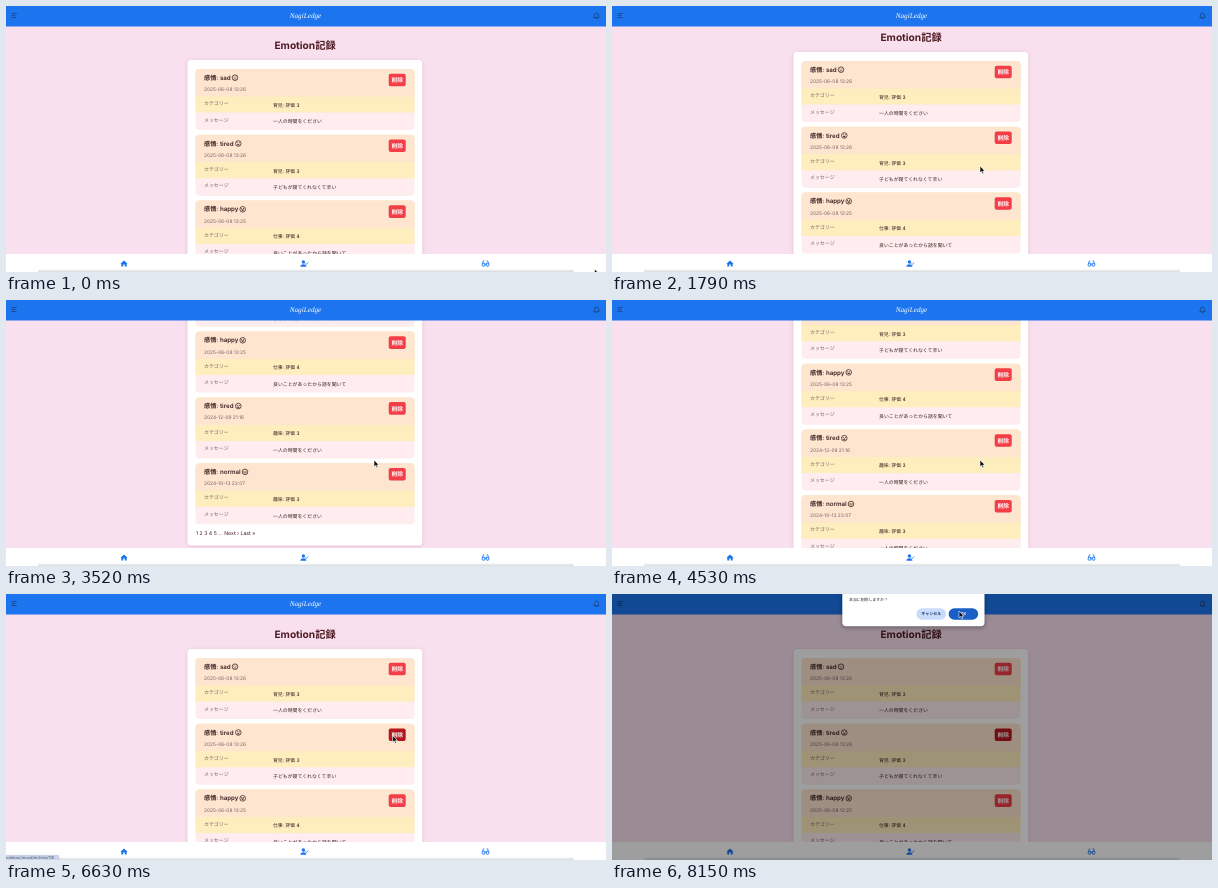
Animation, 600 px wide and 266 px high, one loop 8.2 s. Source, as an HTML page:

```html
<!DOCTYPE html>
<html lang="ja">
<head>
<meta charset="utf-8">
<title>Emotion記録</title>
<style>
html, body { margin: 0; width: 100%; height: 100%; overflow: hidden; background: #f9e0ef; }
svg { display: block; }
text { font-family: Inter, "Noto Sans CJK JP", sans-serif; text-rendering: geometricPrecision; white-space: pre; }
#card { filter: drop-shadow(0 1px 2px #70405530); }
.brand { font-family: "Liberation Serif", "Noto Serif", serif; font-style: italic; }
.line { fill: none; stroke-linecap: round; stroke-linejoin: round; }
</style>
</head>
<body>
<svg width="600" height="266" viewBox="0 0 600 266">
  <defs>
    <linearGradient id="edge" x2="0" y2="1">
      <stop offset="0" stop-color="#fff"/><stop offset="1" stop-color="#d5d8da"/>
    </linearGradient>
  </defs>
  <rect width="600" height="266" fill="#f9e0ef"/>
  <g id="page"></g>
  <g id="bars"></g>
  <g id="status"></g>
  <g id="dialog"></g>
  <path id="cursor" d="M0 0V6.8L1.6 5.4 2.7 7.8 3.9 7.3 2.8 5H5Z" fill="#111" stroke="#fff" stroke-width=".6"/>
</svg>
<script>
const LOOP = 8200, PITCH = 65.8;
const $ = id => document.getElementById(id);

const rect = (x, y, w, h, fill, r = 0, more = '') =>
  `<rect x="${x}" y="${y}" width="${w}" height="${h}" rx="${r}" fill="${fill}" ${more}/>`;
// y is the middle of the line
const text = (x, y, s, size, fill, weight = 400, more = '') =>
  `<text x="${x}" y="${y + size * .37}" font-size="${size}" fill="${fill}" font-weight="${weight}" ${more}>${s}</text>`;
const line = (d, color, width) => `<path class="line" d="${d}" stroke="${color}" stroke-width="${width}"/>`;
const shape = (d, fill) => `<path d="${d}" fill="${fill}"/>`;
const mid = 'text-anchor="middle"';

const mouths = {
  sad: line('M-1.2 1.4Q0 .3 1.2 1.4', '#33201f', .6),
  tired: shape('M-1.4 1.7Q0 -.9 1.4 1.7Z', '#33201f'),
  happy: shape('M-1.6 .3H1.6Q0 3.2 -1.6 .3Z', '#33201f'),
  normal: line('M-1.2 .9H1.2', '#33201f', .7)
};
const face = (x, y, mood) => `<g transform="translate(${x} ${y})">
  <circle r="2.8" fill="none" stroke="#33201f" stroke-width=".75"/>
  <circle cx="-1" cy="-.7" r=".5" fill="#33201f"/><circle cx="1" cy="-.7" r=".5" fill="#33201f"/>${mouths[mood]}</g>`;

const alone = '一人の時間をください';
const entries = [
  ['sad', 229, '2025-06-08 13:26', '育児: 評価 3', alone],
  ['tired', 232.3, '2025-06-08 13:26', '育児: 評価 3', '子どもが寝てくれなくて辛い'],
  ['happy', 236.7, '2025-06-08 13:25', '仕事: 評価 4', '良いことがあったから話を聞いて'],
  ['tired', 232.3, '2024-12-09 21:16', '趣味: 評価 3', alone],
  ['normal', 239, '2024-10-13 23:07', '趣味: 評価 3', alone]
];

const entry = ([mood, faceX, date, rating, message], i) => `<g transform="translate(0 ${63 + i * PITCH})">
  ${rect(189.5, 0, 219, 61, '#feecee', 4)}
  ${shape('M189.5 43.5V4a4 4 0 0 1 4-4H404.5a4 4 0 0 1 4 4V43.5Z', '#feeebd')}
  ${shape('M189.5 27.5V4a4 4 0 0 1 4-4H404.5a4 4 0 0 1 4 4V27.5Z', '#fde5cf')}
  ${text(198, 8.6, '感情: ' + mood, 6.2, '#3a2022', 600)}
  ${face(faceX, 8.7, mood)}
  ${text(198, 20.3, date, 4.85, '#75616a')}
  ${rect(382.7, 4.7, 17, 12.6, '#f33d47', 2, `id="del${i}"`)}
  ${text(391.2, 11, '削除', 5.8, '#fff', 700, mid)}
  ${text(198, 34.4, 'カテゴリー', 4.95, '#75616a')}
  ${text(267, 36, rating, 4.85, '#3a2022', 500)}
  ${text(198, 50.8, 'メッセージ', 4.95, '#75616a')}
  ${text(267, 52.5, message, 4.9, '#3a2022', 500)}
</g>`;

$('page').innerHTML =
  text(299, 39.7, 'Emotion記録', 10.2, '#4d1b22', 700, mid) +
  rect(181.5, 54, 234.7, 354.5, '#fff', 3.5, 'id="card"') +
  entries.map(entry).join('') +
  text(190, 396, '1 2 3 4 5 … Next › Last »', 5.2, '#4d1b22');

const blue = '#1c75ee';
$('bars').innerHTML =
  rect(0, 0, 600, 20.5, blue) +
  line('M5.8 7.6H10.5M5.8 9.6H9M5.8 11.6H10', '#173a70', .7) +
  text(299.5, 9, 'NagiLedge', 7.2, '#fff', 400, `class="brand" ${mid}`) +
  line('M588 11.3Q588.7 10.4 588.7 8.8A1.8 1.8 0 0 1 592.3 8.8Q592.3 10.4 593 11.3ZM590 12.5H591', '#173a70', .7) +
  rect(0, 248, 600, 18, '#fff') +
  rect(32, 263, 536, 3, 'url(#edge)', 1) +
  shape('M114.4 257.7 118 254.4 121.6 257.7H120.7V260.6H118.8V258.6H117.2V260.6H115.3V257.7Z', blue) +
  `<circle cx="297.4" cy="256" r="1.7" fill="${blue}"/>` +
  shape('M294.4 260.7Q294.4 258.2 297.4 258.2T300.4 260.7Z', blue) +
  line('M299.4 257.6 300.3 258.5 301.9 256.7', blue, .8) +
  line('M476.6 257.6 477.2 254.9H478M482.4 257.6 481.8 254.9H481M478.6 258.1H480.4', blue, .8) +
  rect(476.2, 257.2, 2.6, 3, 'none', .8, `stroke="${blue}" stroke-width=".9"`) +
  rect(480.2, 257.2, 2.6, 3, 'none', .8, `stroke="${blue}" stroke-width=".9"`);

$('status').innerHTML =
  rect(-3, 261.3, 56, 8, '#cbd6ea', 1.5, 'stroke="#a9b5c9" stroke-width=".4"') +
  text(-1, 264, 'notebox/mood/entries/118', 4, '#46536b');

$('dialog').innerHTML =
  rect(0, 0, 600, 266, '#000', 0, 'opacity=".38"') +
  rect(230.3, -6, 142.2, 38.3, '#fff', 4, 'style="filter:drop-shadow(0 1px 2px #0006)"') +
  text(237, 6, '本当に削除しますか？', 3.9, '#222', 500) +
  rect(304.3, 14.2, 29.8, 11.6, '#c9dcfa', 5.8) +
  text(319.2, 20, 'キャンセル', 4, '#16386e', 700, mid) +
  rect(336.6, 14.2, 29.6, 11.6, '#1b5fc6', 5.8) +
  text(351.4, 20, 'OK', 4, '#fff', 600, mid);

// Monotone cubic through [time, value] points
function track(points) {
  const last = points.length - 1;
  const slope = i => (points[i + 1][1] - points[i][1]) / (points[i + 1][0] - points[i][0]);
  const tangent = i => {
    if (i === 0 || i === last) return 0;
    const a = slope(i - 1), b = slope(i);
    return a * b > 0 ? 2 * a * b / (a + b) : 0;
  };
  return t => {
    if (t <= points[0][0]) return points[0][1];
    if (t >= points[last][0]) return points[last][1];
    const i = points.findIndex(p => p[0] > t) - 1;
    const [t0, v0] = points[i], [t1, v1] = points[i + 1];
    const d = t1 - t0, u = (t - t0) / d, w = 1 - u;
    return v0 * w * w * (1 + 2 * u) + v1 * u * u * (3 - 2 * u) +
      d * u * w * (tangent(i) * w - tangent(i + 1) * u);
  };
}

const scroll = track([[1450, 0], [1790, 8], [2510, 60], [3450, 163], [3750, 163], [4530, 131], [5800, -1]]);
const cursorX = track([[30, 588.5], [950, 368], [6050, 368], [6550, 386.5], [7000, 386.5], [7800, 347]]);
const cursorY = track([[30, 263], [950, 160], [6050, 160], [6550, 141.5], [7000, 141.5], [7800, 17]]);
const show = (id, on) => $(id).setAttribute('visibility', on ? 'visible' : 'hidden');

function draw(now) {
  const t = now % LOOP;
  $('page').setAttribute('transform', `translate(0 ${-scroll(t)})`);
  $('cursor').setAttribute('transform', `translate(${cursorX(t)} ${cursorY(t)})`);
  $('del1').setAttribute('fill', t >= 6420 ? '#b4161f' : '#f33d47');
  show('status', t >= 6420 && t < 6860);
  show('dialog', t >= 6860);
  requestAnimationFrame(draw);
}
draw(0);
</script>
</body>
</html>
```
